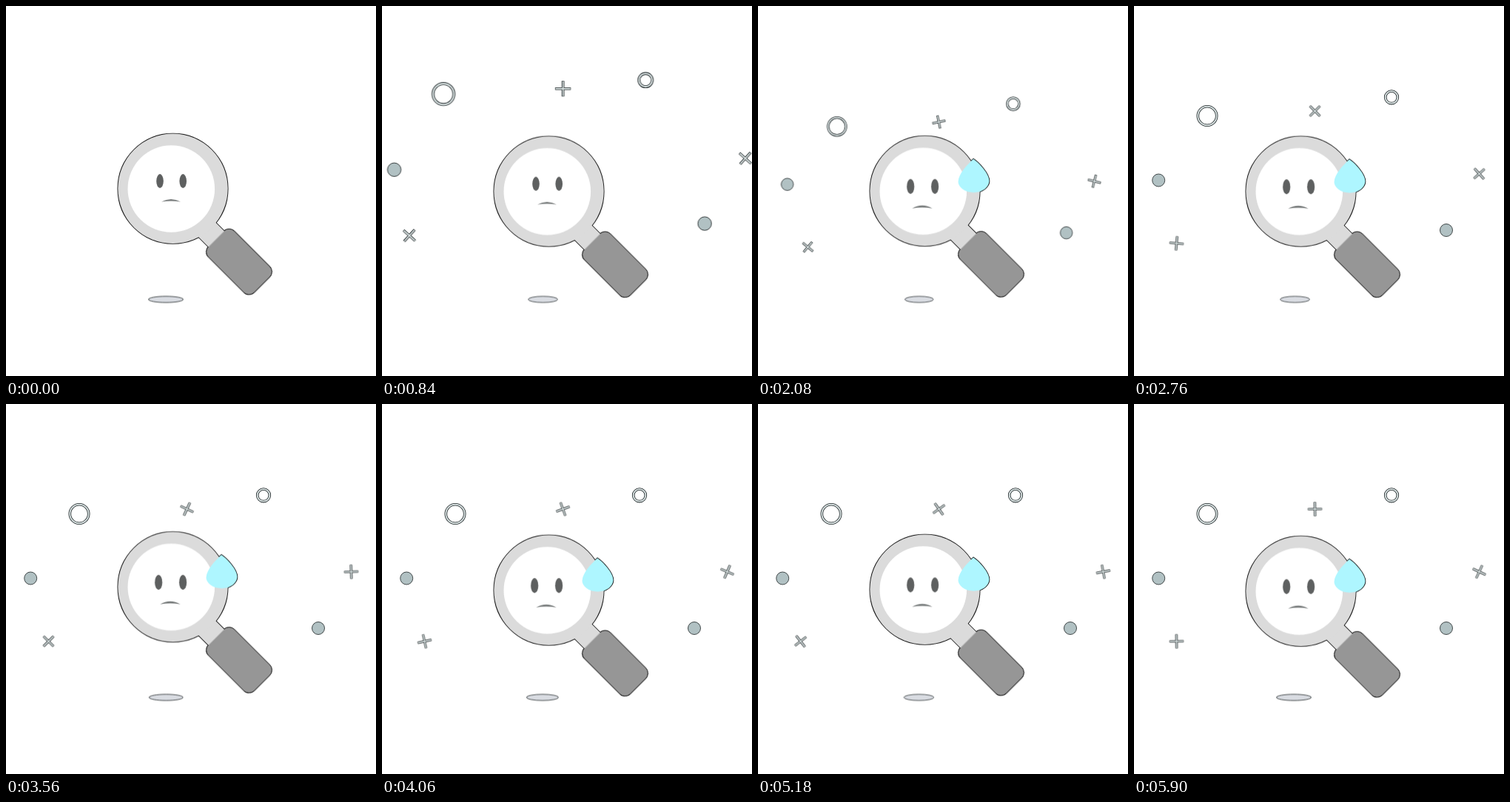
Write an HTML page that moves like this. It is 500x500 px and loops after 5.92 s.

```html
<!DOCTYPE html>
<html lang="en">
<head>
<meta charset="utf-8">
<title>Worried magnifier</title>
<style>
  html, body { margin: 0; width: 100%; height: 100%; overflow: hidden; background: #fff; }
  svg { display: block; width: 100vw; height: 100vh; }

  .bob, .shadow, .big, .small, .face, .drop, .spin {
    animation: 5.92s linear infinite;
  }
  .bob { animation-name: bob; }
  .shadow { animation-name: shrink; }
  .big { animation-name: pop-big; animation-timing-function: ease-in-out; }
  .small { animation-name: pop-small; animation-timing-function: ease-in-out; }
  .face { animation-name: frown; animation-timing-function: ease-in-out; transform-origin: 223.5px 250px; }
  .drop { animation-name: sweat; animation-timing-function: ease-out; transform-origin: 291px 203px; }
  .top { animation-name: spin-top; }
  .right { animation-name: spin-right; }
  .left { animation-name: spin-left; }

  /* one stroke every 600 ms, resting low after the ninth */
  @keyframes bob {
    0%, 20.27%, 40.54%, 60.81%, 81.08% { transform: translateY(0); }
    10.135%, 30.405%, 50.676%, 70.946%, 91.216%, 100% { transform: translateY(6.2px); }
  }
  @keyframes shrink {
    0%, 10.135%, 20.27%, 30.405%, 40.54%, 50.676%, 60.81%, 70.946%, 81.08%, 91.216%, 100% {
      transform: translateX(216px);
    }
    5.068%, 15.203%, 25.338%, 35.473%, 45.608%, 55.743%, 65.878%, 76.014%, 86.149% {
      transform: translateX(217.9px) scaleX(.815);
    }
  }
  @keyframes pop-big {
    0% { transform: scale(0); }
    14.19% { transform: scale(1.11); }
    32.09% { transform: scale(.938); }
    43.92%, 100% { transform: scale(1); }
  }
  @keyframes pop-small {
    0% { transform: scale(0); }
    14.19% { transform: scale(1.079); }
    32.09% { transform: scale(.965); }
    43.92%, 100% { transform: scale(1); }
  }
  @keyframes frown {
    0%, 16.9% { transform: none; }
    25.3%, 100% { transform: translate(-1px, 4.7px) scale(1.055); }
  }
  @keyframes sweat {
    0%, 23.6% { transform: scale(0); }
    30.4%, 100% { transform: scale(1); }
  }
  @keyframes spin-top {
    0% { transform: rotate(-55deg); }
    14.19% { transform: rotate(0deg); }
    35.14% { transform: rotate(78deg); }
    46.62% { transform: rotate(135deg); }
    60.14% { transform: rotate(205deg); }
    77.03% { transform: rotate(295deg); }
    100% { transform: rotate(360deg); }
  }
  @keyframes spin-right {
    to { transform: rotate(296deg); }
  }
  @keyframes spin-left {
    0% { transform: rotate(0deg); }
    14.19% { transform: rotate(42deg); }
    35.14% { transform: rotate(130deg); }
    46.62% { transform: rotate(185deg); }
    60.14% { transform: rotate(225deg); }
    77.03% { transform: rotate(290deg); }
    100% { transform: rotate(360deg); }
  }

  .outline { stroke: #111; stroke-width: 1.7; }
  .thin { stroke: #1c2224; stroke-width: .8; }
  .dark { fill: none; stroke: #20282a; stroke-width: 3.6; }
  .light { fill: none; stroke: #d5dede; stroke-width: 2; }
</style>
</head>
<body>
<svg viewBox="0 0 500 500">
  <defs>
    <g id="glass">
      <g transform="translate(315 345.6) rotate(45)">
        <rect x="-72" y="-15" width="40" height="30" fill="#dbdbdb"/>
        <rect x="-43.5" y="-24.5" width="87" height="49" rx="10" fill="#969696"/>
      </g>
      <circle cx="225.5" cy="246.7" r="74.2" fill="#dbdbdb"/>
    </g>
    <path id="tear" fill="#aef6ff" d="M291 203.5C298 208 312.5 223 312.5 233.5C312 241 304 248.7 291.5 248.7C279 248.7 270.5 241 270.5 234C271 223 283 211 291 203.5Z"/>
    <path id="plus" d="M-9.5 0H9.5M0-9.5V9.5"/>
    <g id="cross">
      <use href="#plus" class="dark" style="stroke-width:3.2"/>
      <path d="M-9 0H9M0-9V9" class="light" style="stroke-width:1.6"/>
    </g>
  </defs>

  <g transform="translate(244 417)">
    <g class="big">
      <g transform="translate(-145 -268.5)">
        <circle r="12.7" class="dark"/>
        <circle r="12.7" class="light"/>
      </g>
      <g transform="translate(.5 -275)"><use href="#cross" class="spin top"/></g>
      <g transform="translate(222.5 -190.3)"><use href="#cross" class="spin right"/></g>
      <g transform="translate(-186.5 -96.3)"><use href="#cross" class="spin left"/></g>
    </g>
    <g class="small">
      <g transform="translate(104 -293.7)">
        <circle r="8.3" class="dark"/>
        <circle r="8.3" class="light"/>
      </g>
      <g fill="#b1c1c3" class="thin">
        <circle cx="-210.8" cy="-181.5" r="8.5"/>
        <circle cx="178" cy="-114" r="8.5"/>
      </g>
    </g>
  </g>

  <g transform="translate(0 396.5)">
    <ellipse class="shadow thin" rx="23.5" ry="4.2" fill="#d9dce2"/>
  </g>

  <g class="bob">
    <g class="outline">
      <use href="#glass"/>
      <use href="#tear" class="drop"/>
    </g>
    <use href="#glass"/>
    <circle cx="223.3" cy="247" r="58.8" fill="#fff"/>
    <g class="face">
      <g fill="#5e6060">
        <ellipse cx="208" cy="236.6" rx="4.8" ry="9.5"/>
        <ellipse cx="239.2" cy="236.6" rx="4.8" ry="9.5"/>
      </g>
      <path d="M210 264.6Q223 257.4 236 264.6Q223 262.6 210 264.6Z" fill="#767a7a"/>
    </g>
    <use href="#tear" class="drop"/>
  </g>
</svg>
</body>
</html>
```
